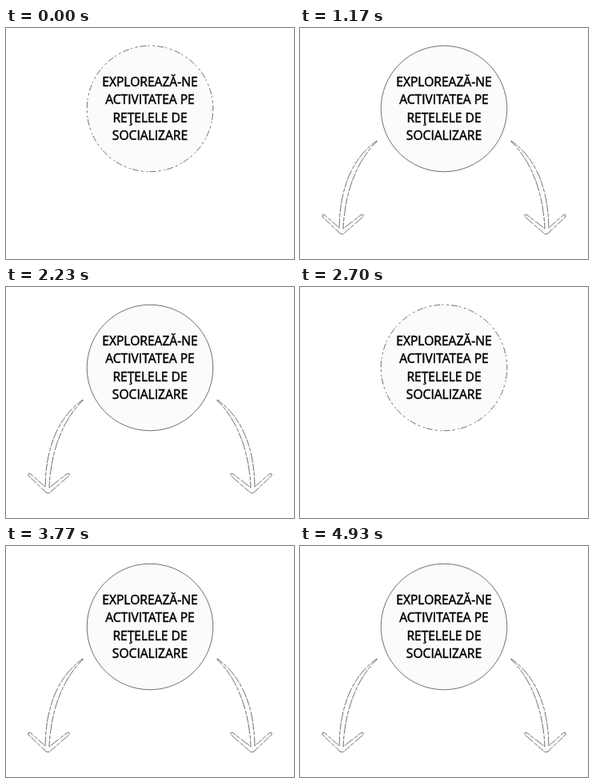
Write an HTML page that moves like this. It is 360 px wide and 289 px high and loops after 5030 ms.

```html
<!DOCTYPE html>
<html lang="ro">
<head>
<meta charset="utf-8">
<title>Rețele de socializare</title>
<style>
  html, body { margin: 0; width: 100%; height: 100%; overflow: hidden; background: #fff; }
  svg { display: block; width: 100vw; height: 100vh; }
  .line { fill: #fcfcfc; stroke: #111; stroke-width: .6; vector-effect: non-scaling-stroke; }
  .arrow { stroke-dasharray: 9 1.5 5 2 13 1; }
  #disc { fill: #fbfbfb; }
  #disc.sparse { stroke-dasharray: 3 3 8 2 2 4; }
  text {
    font: 500 15.6px "Open Sans", "Noto Sans", sans-serif;
    text-anchor: middle;
    stroke: #000; stroke-width: .5; stroke-linejoin: round;
  }
</style>
</head>
<body>
<svg viewBox="0 0 360 289">
  <defs>
    <!-- Drawn relative to the tail, which is the pivot -->
    <path id="shape" class="line arrow" transform="translate(-96 -142)" d="
      M96 141 C72 158 50 190 49 250
      L31 234 Q27 232 28 236 L50 257 Q52.5 259 55 257
      L79 236 Q80 232 76 234 L54 251
      C56 204 72 165 96 142 Z"/>
  </defs>
  <g transform="translate(96 142)"><use class="swing" href="#shape"/></g>
  <g transform="translate(264 142) scale(-1 1)"><use class="swing" href="#shape"/></g>
  <circle id="disc" class="line" cx="180" cy="101" r="78.8"/>
  <text x="180" y="72.7">EXPLOREAZĂ-NE</text>
  <text x="180" y="95.3">ACTIVITATEA PE</text>
  <text x="180" y="117.8">REȚELELE DE</text>
  <text x="180" y="140.3">SOCIALIZARE</text>
</svg>
<script>
const LOOP = 5030, PASS = 2700, START = 130;

// time in ms, scale, rotation in degrees
const steps = [
  [130, 0.04, 22], [230, 0.32, 18], [330, 0.63, 13], [430, 0.9, 8],
  [500, 1.04, 5], [570, 1.16, 2.4], [630, 1.215, 0.9], [730, 1.145, 0.3],
  [830, 1.05, 0], [930, 1, 0]
];
const arrows = document.querySelectorAll('.swing');
const disc = document.getElementById('disc');

function pose(time) {
  const next = steps.findIndex(step => step[0] > time);
  if (next < 0) return [1, 0];
  const a = steps[next - 1], b = steps[next];
  const k = (time - a[0]) / (b[0] - a[0]);
  return [a[1] + (b[1] - a[1]) * k, a[2] + (b[2] - a[2]) * k];
}

function draw() {
  const time = performance.now() % LOOP % PASS;
  const shown = time >= START;
  disc.classList.toggle('sparse', !shown);
  const [scale, angle] = shown ? pose(time) : [1, 0];
  for (const arrow of arrows) {
    arrow.setAttribute('visibility', shown ? 'visible' : 'hidden');
    arrow.setAttribute('transform', `rotate(${angle}) scale(${scale})`);
  }
  requestAnimationFrame(draw);
}
draw();
</script>
</body>
</html>
```
